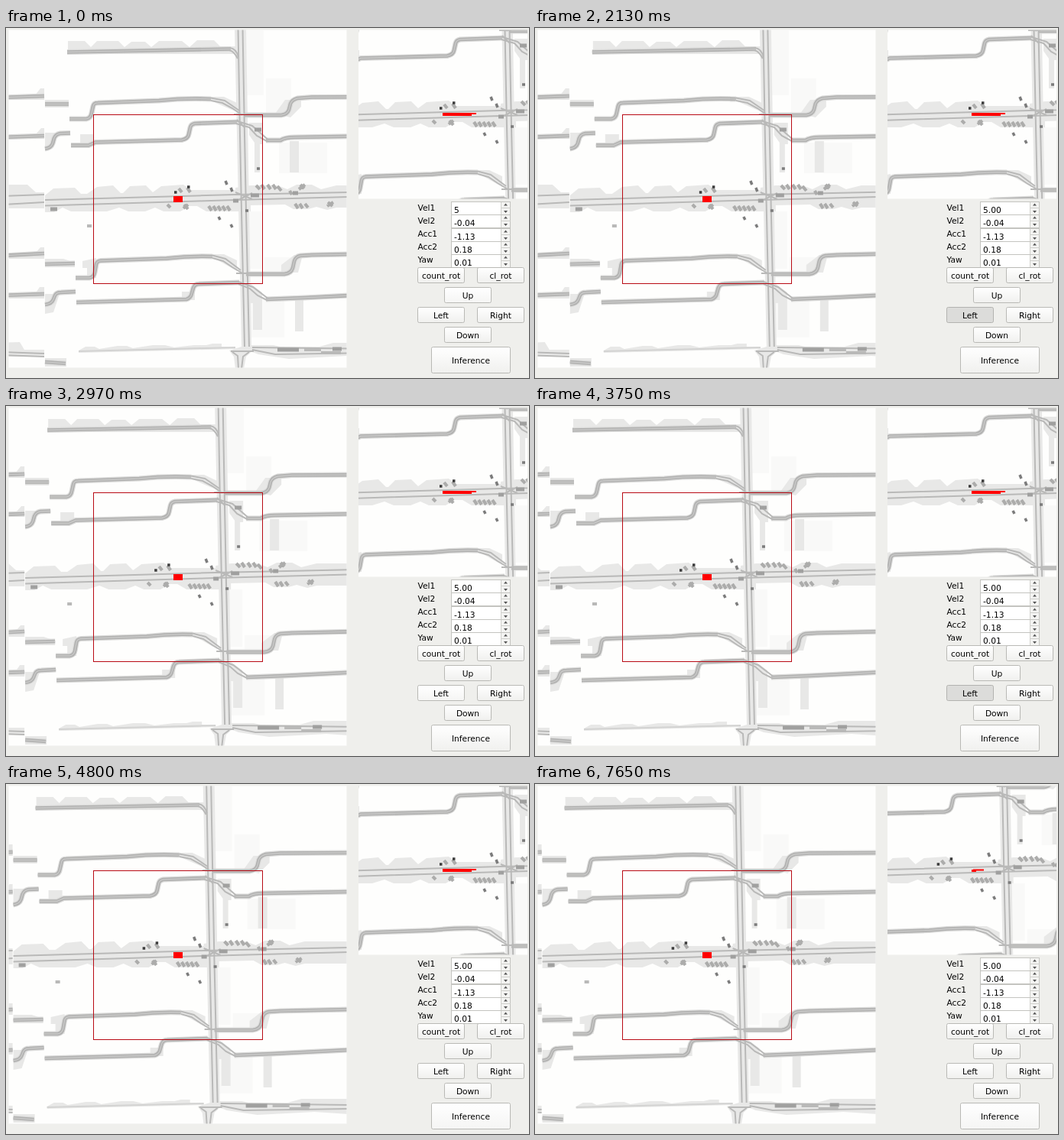
Recreate the animation shown at these times as an HTML page. Size 684 px wide and 458 px high, loop 8000 ms.

```html
<!DOCTYPE html>
<html lang="en">
<head>
<meta charset="utf-8">
<title>Map control</title>
<style>
  html, body { margin: 0; width: 100%; height: 100%; overflow: hidden; background: #efefec; }
  svg { display: block; width: 684px; height: 458px; font: 10.67px "DejaVu Sans", sans-serif; }
  path { fill: none; }
  .area path { fill: #e8e8e7; }
  .faint path { fill: #f9f9f8; }
  .edge { stroke: #dcdcdb; stroke-width: 7; stroke-linejoin: round; }
  .core { stroke: #b1b1b0; stroke-width: 4.6; stroke-linejoin: round; }
  .middle { stroke: #c9c9c8; stroke-width: 1.4; stroke-linejoin: round; }
  .lane { stroke: #b9b9b8; stroke-width: 2; }
  .cars { stroke: #acacab; stroke-width: 4.2; }
  .dark { stroke: #3c3c3c; stroke-width: 3.5; }
  .mid { stroke: #7c7c7c; stroke-width: 3.5; }
  .block { stroke: #a0a09f; stroke-width: 5; }
  .button rect { fill: url(#face); stroke: #b9b9b5; }
  .button text { text-anchor: middle; }
  .button.hover rect { fill: url(#lit); }
  .button.pressed rect { fill: #dcdcda; stroke: #b3b3b0; }
</style>
</head>
<body>
<svg id="stage" viewBox="0 0 684 458">
  <defs>
    <linearGradient id="face" x2="0" y2="1">
      <stop stop-color="#fff"/><stop offset="1" stop-color="#f0f0ee"/>
    </linearGradient>
    <linearGradient id="lit" x2="0" y2="1">
      <stop stop-color="#fff"/><stop offset="1" stop-color="#f5f5f4"/>
    </linearGradient>
    <filter id="soft" filterUnits="userSpaceOnUse" x="-10" y="-10" width="520" height="480" color-interpolation-filters="sRGB">
      <feGaussianBlur stdDeviation=".55"/>
    </filter>
    <clipPath id="mainClip"><rect x="3.5" y="2.5" width="442" height="442"/></clipPath>
    <clipPath id="insetClip"><rect x="461" y="2.5" width="221" height="221"/></clipPath>

    <g id="roads">
      <path d="M80 31.5L294 27.5"/>
      <path d="M-5 91L50 89M51 99.5H82"/>
      <path d="M83 119H105Q111 118 112 111L114 102Q115 98 120 98L200 95Q235 91.5 268 93"/>
      <path d="M312 114H360Q368 113 370 107L372 99Q374 94 381 92L400 90.5L490 90"/>
      <path d="M-5 143L50 141M51 158Q59 157 61 151L63 144Q65 139 71 138L84 137.5"/>
      <path d="M85 153.5H108L117 149.5L230 146.5Q238 145 239 139L241 130Q242 126 247 125L302 123"/>
      <path d="M340 147H359Q365 143 378 143L490 141"/>
      <path d="M-5 298L50 295M51 309L90 308"/>
      <path d="M91 327H109Q115 326 116 320L118 309Q119 305 124 304.5L210 301.5Q240 298 270 299"/>
      <path d="M314 322H364Q373 321 375 314L377 305Q379 299 385 298L400 297L490 295"/>
      <path d="M-5 350L50 348M51 362Q60 361 62 355L64 350Q66 346 72 346L91 345"/>
      <path d="M92 359L236 355Q242 353 243 347L245 340Q247 335 252 335L305 333"/>
      <path d="M340 355L390 353L490 348"/>
      <path d="M51 437L78 439"/>
    </g>

    <g id="map" filter="url(#soft)">
      <g class="faint">
        <path d="M313 2h24v86h-24zM340 66h33v46h-33zM357 150h63v40h-63zM313 240h22v75h-22zM314 352h50v53h-50zM338 300h35v20h-35z"/>
      </g>
      <g class="area">
        <path d="M81 17H103L111 25L119 17H147L155 25L164 18H182L190 25L200 17H230L240 25L250 16H272L280 24H302V34H81z"/>
        <path d="M50 79H45L38 88H4V94H50zM51 94H82V104H51zM230 90H285L302 98V110L270 96zM352 112L365 94H386V103L372 117z"/>
        <path d="M50 131H46L38 140H4V145H50zM51 137H68L62 154L51 161zM97 139H115V150H97zM318 124H336V152H332V189H325V150L318 140zM371 148H383V189H371z"/>
        <path d="M-10 205H28L39 215H50V236H-10z"/>
        <path d="M51 219L62 210L90 209L98 217L106 217L119 208L140 206L150 216H153L162 207L183 206L192 215L203 207L232 205L242 212H300V209L320 206H355L368 211L380 205H400L412 211L432 206H490V235H432L420 238L406 234L395 237H376L365 231L320 232V240H262L250 233H240L228 240H206L195 235L182 240H160L148 235L132 240H85L74 235L63 241H51z"/>
        <path d="M50 287H45L38 295H4V302H50zM51 302H75L90 307V313H51zM100 305L118 301V327H106V314H100zM240 296H285L302 304V318L272 301zM360 310L377 297H388L382 320H360z"/>
        <path d="M50 339H44L38 348H4V354H50zM51 348H70L62 372L51 374zM230 345H247V356H230zM319 334L335 346V395H323V360H319zM378 356H389V397H378z"/>
        <path d="M-10 412L18 411L24 421H50V430H-10zM51 432H79V443H51z"/>
        <path d="M95 422L104 417H116L122 420L146 416H158L166 419L192 415H208L220 418L246 415H262L270 413H282V417L300 418V420L95 425z"/>
        <path d="M320 415H350L358 417H410L428 412H490V432L445 429L370 433L330 427L320 423z"/>
        <path d="M299 0H314L321 417L326 419L314 430L311 446H300L298 430L292 422L308 417z"/>
      </g>
      <use href="#roads" class="edge"/>
      <use href="#roads" class="core"/>
      <use href="#roads" class="middle"/>
      <g class="lane">
        <path d="M303.5 0L306 140L308 240L312 417M309.5 0L312 140L314 240L318 417"/>
        <path d="M296 424L303 429L304 446M318 424L310 430L308 446M294 423H324"/>
        <path d="M293 26Q301 27 304 38M292 29Q298 30 303 40"/>
        <path d="M268 91.5L286 95L305 108M268 95L283 98L296 105L309 114M298 113H314"/>
        <path d="M301 121.5L322 128L342 145.5M301 125L318 130L328 141L342 148.5M302 120L312 130"/>
        <path d="M270 297.5L287 302L307 317M270 301L284 305L296 313L311 322M301 321H316"/>
        <path d="M304 332L323 339L342 353.5M304 335L319 341L329 350L342 356.5"/>
        <path d="M-5 220L50 218M-5 231L50 228M51 225L300 218L490 214M51 232.5L300 225L490 220M300 215L322 224M300 227L322 216"/>
        <path d="M-5 424L50 426M-5 428L50 430M322 418L490 420M322 421L352 427L490 425"/>
        <path stroke="#d3d3d2" d="M95 423L300 418"/>
      </g>
      <g class="cars">
        <path d="M226 210l4 5M237 209l4 6M211 231l4 4M232 236l6-5M233 231l5 6"/>
        <path d="M265 233l4 6m2-6l4 6m2-6l4 6m2-6l4 6m2-6l4 6"/>
        <path d="M327 206l5 5m2-6l4 6m4-6l4 6m3-6l4 6m2-4l5 6M371 213l3 5M383 211l8-6M385 205l5 5"/>
        <path d="M378 230l4 6m2-6l4 6m3-6l4 5M420 233l8-5M421 228l6 5"/>
      </g>
      <path class="dark" d="M220 215h3.5M237 208h3.5"/>
      <path class="mid" d="M287 200l2 5M294 209l2 5M278 247l2 4M294 257l2 4M313 239h4M328 184h4"/>
      <path class="block" d="M325 133h9M58 237h9M297 226h7M320 219h11M375 216h7M355 421h28M427 420h12"/>
      <path stroke="#b9b9b8" stroke-width="4" d="M106 259h6M390 421h22M412 425h26"/>
    </g>
  </defs>

  <rect width="684" height="458" fill="#efefec"/>
  <g clip-path="url(#mainClip)">
    <rect width="446" height="446" fill="#fefefd"/>
    <use id="mainMap" href="#map"/>
  </g>
  <rect x="114.5" y="113.5" width="221" height="221" fill="none" stroke="#b80a14"/>
  <rect x="219" y="220" width="12" height="8" fill="#f00"/>

  <g clip-path="url(#insetClip)">
    <rect x="461" width="222" height="224" fill="#fefefd"/>
    <use id="insetMap" href="#map"/>
    <path id="plan" style="fill:#f00"/>
  </g>
  <g id="panel"></g>
</svg>
<script>
const LOOP = 8000, STEP = 5.17;
// Press and release times of the Left button; each release moves the map one step.
const presses = [[1710, 1770], [2130, 2220], [2400, 2490], [2760, 2850],
  [2910, 2970], [3090, 3180], [3750, 3810], [4230, 4290]];
const INFER = [5160, 5220], RESULT = 7650;

const get = id => document.getElementById(id);
const panel = get('panel');

function add(parent, tag, attrs, text) {
  const node = document.createElementNS('http://www.w3.org/2000/svg', tag);
  for (const key in attrs) node.setAttribute(key, attrs[key]);
  if (text) node.textContent = text;
  return parent.appendChild(node);
}

function field(label, value, row) {
  const y = Math.round(228 + row * 17.3);
  add(panel, 'text', { x: 538.5, y: 239 + row * 17 }, label);
  add(panel, 'rect', { x: 582.5, y: y - .5, width: 77, height: 17, fill: '#fff', stroke: '#c4c4c0' });
  add(panel, 'rect', { x: 648, y, width: 11, height: 16, fill: '#f4f4f2' });
  add(panel, 'path', { d: `M647.5 ${y}v16M648 ${y + 7.5}h12`, stroke: '#d0d0cc' });
  add(panel, 'path', { d: `M651 ${y + 4.5}l2.5-3 2.5 3zM651 ${y + 11}l2.5 3 2.5-3z`, style: 'fill:#555' });
  return add(panel, 'text', { x: 586, y: y + 14 }, value);
}

function button(label, x, y, w = 62, h = 21) {
  const g = add(panel, 'g', { class: 'button' });
  add(g, 'rect', { x: x + .5, y: y + .5, width: w - 1, height: h - 1, rx: 2 });
  add(g, 'text', { x: x + w / 2, y: Math.round(y + h / 2 + 4) }, label);
  return g;
}

const velocity = [['Vel1', '5'], ['Vel2', '-0.04'], ['Acc1', '-1.13'], ['Acc2', '0.18'], ['Yaw', '0.01']]
  .map(([label, value], row) => field(label, value, row))[0];
button('count_rot', 538, 313);
button('cl_rot', 616, 313);
const up = button('Up', 573, 339);
const left = button('Left', 538, 365);
button('Right', 616, 365);
button('Down', 573, 391);
const infer = button('Inference', 556, 417, 104, 35);

const within = (t, [from, to]) => t >= from && t < to;

function setState(node, hover, pressed) {
  node.classList.toggle('hover', hover);
  node.classList.toggle('pressed', pressed);
}

function render(t) {
  const shift = -STEP * presses.filter(p => t >= p[1]).length;
  const done = t >= RESULT;
  get('mainMap').setAttribute('transform', `translate(${shift} 0)`);
  get('insetMap').setAttribute('transform', `translate(${347 + (done ? shift : 0)} -110)`);
  get('plan').setAttribute('d', done
    ? 'M571 112H573V111.5H587V113.5H577V115H571z'
    : 'M571 111H615V113H609V115H571z');
  velocity.textContent = shift ? '5.00' : '5';
  setState(up, t < 540, false);
  setState(left, within(t, [840, 4560]), presses.some(p => within(t, p)));
  setState(infer, t >= 4800, within(t, INFER));
}

const start = performance.now();
function tick() {
  render((performance.now() - start) % LOOP);
  requestAnimationFrame(tick);
}
render(0);
requestAnimationFrame(tick);
</script>
</body>
</html>
```
